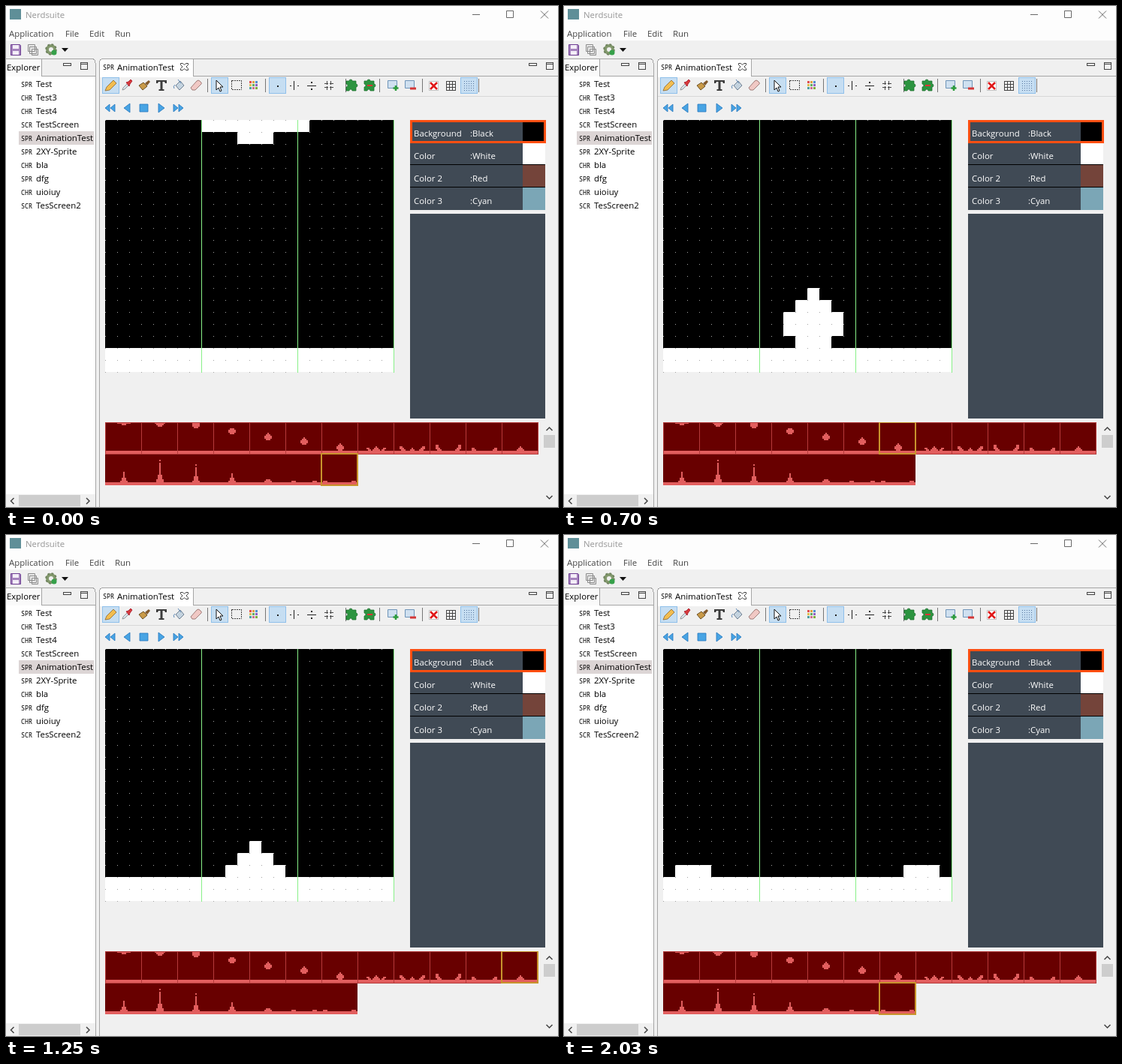
These frames come from a looping animation (735 by 668 pixels, 2090 ms). An HTML page:

```html
<!DOCTYPE html>
<html lang="en">
<head>
<meta charset="utf-8">
<title>Sprite editor</title>
<style>
  html, body { margin: 0; width: 100%; height: 100%; overflow: hidden; background: #f0f0f0; }
  svg { display: block; width: 735px; height: 668px; }
  text { font: 11.4px "Open Sans", "Noto Sans", sans-serif; }
  .tag { font: 8.4px "Noto Sans Mono", "DejaVu Sans Mono", monospace; }
  .pal text { fill: #fff; }
  rect, .crisp { shape-rendering: crispEdges; }
  .line { fill: none; stroke: #444; }
  .on { fill: #c6def2; stroke: #8fc0ea; }
</style>
</head>
<body>
<svg viewBox="0 0 735 668">
  <defs>
    <pattern id="dots" x="132" y="152" width="16" height="16" patternUnits="userSpaceOnUse">
      <rect width="1" height="1" fill="#a2a2a2"/>
    </pattern>
    <clipPath id="film"><rect x="131" y="555" width="580" height="90"/></clipPath>
    <path id="puzzle" d="M-7-6h4a2 2 0 1 1 4 0h5v4a2 2 0 1 1 0 4v5h-5a2 2 0 1 0-4 0h-4v-5a2 2 0 1 0 0-4z" fill="#2c9440" stroke="#176a2a" stroke-width=".7"/>
    <g id="panes" class="line crisp"><path d="M.5 1.5h10v3h-10zM23.5.5h9v9h-9zM23.5 2.5h9"/></g>
  </defs>

  <!-- title, menu and main toolbar -->
  <rect width="735" height="46" fill="#fdfdfd"/>
  <rect x="5" y="4" width="15" height="14" fill="#5f8f98"/>
  <text x="26" y="16" fill="#969696">Nerdsuite</text>
  <path class="line" stroke-opacity=".8" d="M621 11.5h10M666.5 6.5h9v9h-9zM712 6.5l10 10m0-10l-10 10"/>
  <g fill="#444">
    <text x="4" y="41">Application</text><text x="79" y="41">File</text>
    <text x="111" y="41">Edit</text><text x="145" y="41">Run</text>
  </g>
  <path d="M6.500 51.500h12l1 1v13h-13z" fill="#a583bd" stroke="#6c3c92"/>
  <path d="M9 52h8v5H9zM9 60h8v5H9z" fill="#f4eef8"/>
  <path d="M29.500 51.500h9v9h-9zM31.500 54.500h9v9h-9zM34.500 57.500h8v8h-8z" fill="#e8e8e8" stroke="#8c8c8c"/>
  <circle cx="60" cy="58" r="5" fill="none" stroke="#82986c" stroke-width="4"/>
  <circle cx="60" cy="58" r="6.800" fill="none" stroke="#6d805d" stroke-width="2" stroke-dasharray="2.700"/>
  <circle cx="64" cy="62" r="3.500" fill="#36a04a"/>
  <path d="M74 56h9l-4.500 5z" fill="#111"/>

  <!-- explorer -->
  <rect y="70" width="120" height="598" fill="#f0f0f0"/>
  <rect y="71" width="48" height="23" fill="#fafafa"/>
  <rect y="94" width="119" height="557" fill="#fff"/>
  <path class="line crisp" style="stroke:#a5a5a5" d="M0 70.500h114q5 0 5 5V668M47.500 71v22.500H119"/>
  <text x="1" y="86">Explorer</text>
  <use href="#panes" x="76" y="75"/>
  <rect x="17" y="167" width="100" height="18" fill="#dcd5d5"/>
  <g id="tree"></g>
  <rect y="652" width="118" height="16" fill="#f0f0f0"/>
  <rect x="17" y="652" width="82" height="15" fill="#cdcdcd"/>
  <path class="line" stroke-width="1.500" d="M10.500 656l-4 4 4 4M107 656l4 4-4 4"/>

  <!-- editor frame -->
  <rect x="125" y="71" width="124" height="24" fill="#fff"/>
  <path class="line crisp" style="stroke:#a5a5a5" d="M124.500 668V75q0-4.500 5-4.500H735M249.500 71v22.500H735"/>
  <path class="line crisp" style="stroke:#d8d8d8" d="M125 120.500H735"/>
  <text class="tag" x="129" y="85">SPR</text><text x="148" y="86">AnimationTest</text>
  <path class="line" d="M232.500 76.500h3l2 2 2-2h3v2l-2.500 2.500 2.500 2.500v2h-3l-2-2-2 2h-3v-2l2.500-2.500-2.500-2.500z"/>
  <use href="#panes" x="696" y="75"/>

  <!-- drawing tools -->
  <rect class="on" x="128.500" y="95.500" width="22" height="21"/>
  <rect class="on" x="273.500" y="95.500" width="22" height="21"/>
  <rect class="on" x="350.500" y="95.500" width="22" height="21"/>
  <rect class="on" x="605.500" y="95.500" width="22" height="21"/>
  <path class="crisp line" style="stroke:#777" d="M268.500 97v18M345.500 97v18M452.500 97v18M497.500 97v18M554.500 97v18M629.500 97v18"/>
  <path d="M132 113l2-5 9-9 4 4-9 9z" fill="#f2bd50" stroke="#8b6530" stroke-width=".8"/>
  <path d="M155 112l1-3 6-6 2 2-6 6z" fill="#d8e4ec" stroke="#777" stroke-width=".7"/>
  <path d="M160 102l3-1 3-3 2 2-3 4-1 3z" fill="#d83a3a" stroke="#b02838"/>
  <path d="M177 106l6-4 5 5-6 5z" fill="#c99a48" stroke="#6c5024"/>
  <path d="M185 103l5-4 2 2-4 5z" fill="#835a2c"/>
  <path d="M200 99h14v4h-2l-1-2h-2.500v10h2v2h-7v-2h2v-10H203l-1 2h-2z" fill="#3c3c3c"/>
  <path d="M226 106l6-6 5 6-6 6z" fill="#c4d3df" stroke="#6e7f91"/>
  <path d="M225 105q-3 2-1 5M229 98l4 5" class="line" style="stroke:#5a86b4"/>
  <path d="M246 109l8-9q2-2 4 0l2 2q1 2-1 3l-7 7h-4z" fill="#f0c8c4" stroke="#a07c78"/>
  <path d="M280 99v13l3-3 2 5 2-1-2-5h4z" fill="#fff" stroke="#111"/>
  <path class="line crisp" stroke-dasharray="2 1" d="M300.500 99.500h13v12h-13z"/>
  <g id="swatches"></g>
  <path class="crisp" fill="#222" d="M361 106h2v2h-2zM383 100h1v12h-1zM378 106h2v1h-2zM388 106h2v1h-2zM401 106h12v1h-12zM406 101h2v2h-2zM406 110h2v2h-2z"/>
  <path class="line crisp" d="M427.500 100v5M427.500 107v5M432.500 100v5M432.500 107v5M424 103.500h5M431 103.500h5M424 108.500h5M431 108.500h5"/>
  <use href="#puzzle" x="460" y="106"/><use href="#puzzle" x="484" y="106"/>
  <path d="M481 106h7" stroke="#d33" stroke-width="2"/>
  <g fill="#cfe0f0" stroke="#6f94b8"><path d="M508.500 99.500h12v10h-12zM531.500 99.500h12v10h-12z"/></g>
  <path d="M519 106v7M515.500 109.500h7" stroke="#2c9c3c" stroke-width="2.500"/>
  <path d="M538 110h8" stroke="#d33838" stroke-width="3"/>
  <path class="crisp" d="M563.500 100.500h12v12h-12z" fill="#fff" stroke="#c4c4c4"/>
  <path d="M565 102l9 9m0-9l-9 9" stroke="#e01818" stroke-width="2.500"/>
  <path class="line crisp" d="M586.500 100.500h12v12h-12zM590.500 100v12M594.500 100v12M586 104.500h12M586 108.500h12"/>
  <path stroke="#5878a0" class="crisp" stroke-dasharray="1 2" d="M610 100.500h13M610 103.500h13M610 106.500h13M610 109.500h13M610 112.500h13"/>

  <!-- playback -->
  <path d="M138 131v10l-6-5zM145 131v10l-6-5zM165 130v12l-8-6zM178 131h11v10h-11zM203 130l8 6-8 6zM223 131l6 5-6 5zM230 131l6 5-6 5z" fill="#48a4e4" stroke="#2375bd" stroke-width=".8"/>

  <!-- pixel view -->
  <rect x="132" y="152" width="384" height="336"/>
  <path id="view" class="crisp" fill="#fff" transform="translate(132 152) scale(16)"/>
  <rect x="132" y="152" width="384" height="337" fill="url(#dots)"/>
  <path class="crisp" stroke="#88f088" d="M260.500 152v337M388.500 152v337M516.500 152v337"/>

  <!-- palette -->
  <g class="pal" id="palette"></g>
  <rect x="539.500" y="153.500" width="178" height="28" fill="none" stroke="#ff4f12" stroke-width="3"/>
  <rect x="538" y="277" width="180" height="273" fill="#404a55"/>

  <!-- film strip -->
  <rect x="132" y="555" width="576" height="42" fill="#680000"/>
  <rect x="132" y="597" width="336" height="42" fill="#680000"/>
  <g id="strip" fill="#e25e5e"></g>
  <g clip-path="url(#film)">
    <rect id="mark" width="48" height="42" fill="none" stroke="#c8942c" stroke-width="2"/>
  </g>
  <rect x="716" y="572" width="15" height="17" fill="#cdcdcd"/>
  <path class="line" stroke-width="1.500" d="M719.500 566l4-4 4 4M719.500 653l4 4 4-4"/>
</svg>
<script>
const $ = id => document.getElementById(id);

const items = `SPR Test,CHR Test3,CHR Test4,SCR TestScreen,SPR AnimationTest,
SPR 2XY-Sprite,CHR bla,SPR dfg,CHR uioiuy,SCR TesScreen2`.split(",");
$("tree").innerHTML = items.map((item, i) => {
  const [tag, name] = item.trim().split(" "), y = 108 + i * 18;
  return `<text class="tag" x="20" y="${y}">${tag}</text><text x="40" y="${y}">${name}</text>`;
}).join("");

const hues = ["#e05050", "#e0a040", "#5090d0", "#e0c050", "#60b060", "#9060c0", "#50a0a0", "#d07090", "#80b040"];
$("swatches").innerHTML = hues.map((c, i) =>
  `<rect x="${324 + i % 3 * 4}" y="${100 + (i / 3 | 0) * 4}" width="3" height="3" fill="${c}"/>`).join("");

const palette = [["Background", "Black", "#000"], ["Color", "White", "#fff"],
  ["Color 2", "Red", "#74443a"], ["Color 3", "Cyan", "#7ba6b6"]];
$("palette").innerHTML = palette.map(([label, name, fill], i) => {
  const y = 152 + i * 30;
  return `<rect x="538" y="${y}" width="180" height="30" fill="#404a55"/>
    <rect x="688" y="${y}" width="30" height="30" fill="${fill}"/>
    <rect x="538" y="${y + 29}" width="180" height="1" fill="${i < 3 ? "#000" : "none"}"/>
    <text x="543" y="${y + 22}">${label}</text><text x="618" y="${y + 22}">:${name}</text>`;
}).join("");

// Sprites are 24 x 21 cells, built from horizontal runs of columns a..b.
const run = (y, a, b, h = 1) => `M${a} ${y}h${b - a + 1}v${h}h${a - b - 1}z`;
const pair = (y, a, b, h) => run(y, a, b, h) + run(y, 24 - b, 24 - a, h);
const ball = y => run(y, 11, 13) + run(y + 1, 10, 14, 2) + run(y + 3, 11, 13);
const drop = y => run(y, 12, 12) + ball(y + 1);
const spike = (...tops) => tops.map((y, i) => run(y, 12 - i, 12 + i, 19 - y)).join("");

const sprites = [
  run(0, 8, 16) + run(1, 11, 13),
  run(0, 9, 15) + run(1, 10, 14) + run(2, 11, 13),
  run(0, 10, 14, 3) + run(3, 11, 13),
  ball(4),
  drop(7),
  drop(10),
  drop(14),
  pair(17, 6, 7) + pair(18, 7, 8) + spike(16, 17, 18),
  pair(16, 4, 5) + pair(17, 4, 6) + pair(18, 5, 7) + spike(17, 18),
  pair(15, 4, 5, 2) + pair(17, 4, 6) + pair(18, 5, 7),
  pair(17, 4, 5) + pair(18, 4, 6),
  spike(16, 17, 18),
  spike(12, 16, 18),
  run(4, 12, 12) + spike(6, 14, 17),
  run(7, 12, 12) + spike(9, 15, 18),
  spike(13, 16, 18),
  spike(17, 17, 18),
  pair(18, 4, 6),
  run(18, 1, 3) + run(18, 20, 22),
].map(d => d + run(19, 0, 23, 2));

const slot = i => [132 + i % 12 * 48, i < 12 ? 555 : 597];
$("strip").innerHTML = sprites.map((d, i) => {
  const [x, y] = slot(i);
  return `<path class="crisp" d="${d}" transform="translate(${x} ${y}) scale(2)"/>` +
    (i < 12 ? `<rect x="${x + .5}" y="555.5" width="48" height="42" fill="none" stroke="#b43a3a"/>` : "");
}).join("");

// The screen refreshes at these times; the strip marker trails the view a little.
const ticks = [0, 70, 150, 230, 310, 390, 470, 540, 620, 700, 770, 860, 940, 1020, 1090,
  1180, 1250, 1320, 1490, 1560, 1640, 1720, 1780, 1870, 1940, 2030];
const shown = [0, 1, 1, 2, 3, 3, 4, 5, 6, 6, 7, 8, 8, 9, 10,
  11, 11, 12, 13, 14, 15, 15, 16, 17, 18, 18];

let last = -1;
function draw(now) {
  const t = now % 2090;
  const k = ticks.findLastIndex(s => s <= t);
  if (k !== last) {
    last = k;
    $("view").setAttribute("d", sprites[shown[k]]);
    const [x, y] = slot((Math.floor((ticks[k] - 20) / 110) + 19) % 19);
    $("mark").setAttribute("x", x);
    $("mark").setAttribute("y", y);
  }
  requestAnimationFrame(draw);
}
draw(performance.now());
</script>
</body>
</html>
```
